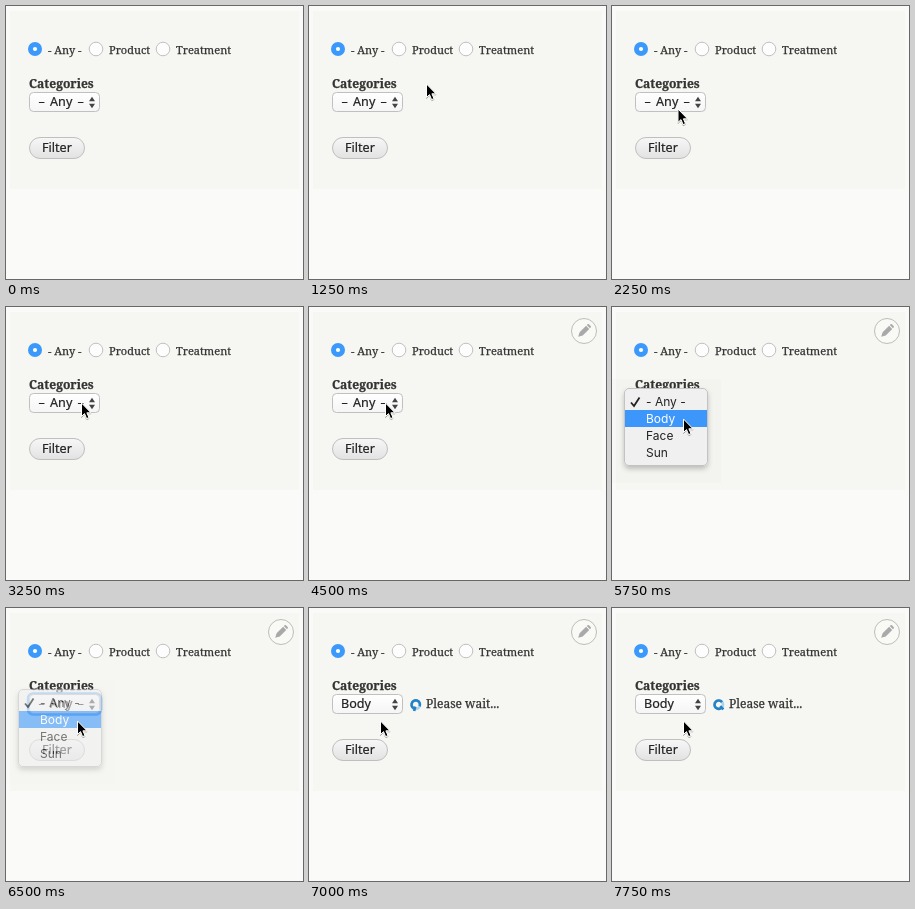
Animation, 297 px wide and 273 px high, one loop 8000 ms. Source, as an HTML page:

```html
<!DOCTYPE html>
<html lang="en">
<head>
<meta charset="utf-8">
<title>Filter form</title>
<style>
html, body { margin: 0; width: 100%; height: 100%; overflow: hidden; background: #fafaf8; }
svg { display: block; }
.serif { font: 11px "Noto Serif", serif; fill: #333; }
.serif text, text.serif { stroke: #333; stroke-width: .25px; }
.sans { font: 12.6px "Noto Sans", sans-serif; fill: #222; stroke: #222; stroke-width: .2px; }
.menu { font: 12px Inter, sans-serif; fill: #222; }
</style>
</head>
<body>
<svg width="297" height="273" viewBox="0 0 297 273">
  <defs>
    <linearGradient id="face" x2="0" y2="1">
      <stop stop-color="#fff"/><stop offset="1" stop-color="#f5f5f5"/>
    </linearGradient>
    <linearGradient id="pill" x2="0" y2="1">
      <stop stop-color="#f7f7f7"/><stop offset="1" stop-color="#e2e2e2"/>
    </linearGradient>
    <filter id="shadow" x="-20%" y="-20%" width="140%" height="150%">
      <feDropShadow dx="0" dy="3" stdDeviation="2.5" flood-opacity=".22"/>
    </filter>
    <filter id="lift" x="-50%" y="-50%" width="200%" height="200%">
      <feDropShadow dx="0" dy="1" stdDeviation=".7" flood-opacity=".35"/>
    </filter>
  </defs>

  <rect x="4" y="5" width="289" height="178" fill="#f6f7f2"/>

  <g class="serif">
    <circle cx="29" cy="43" r="7" fill="#3b99fc"/>
    <circle cx="29" cy="43" r="2.1" fill="#fff"/>
    <g fill="#fdfdfd" stroke="#c0c0c0">
      <circle cx="90" cy="43" r="6.8"/>
      <circle cx="157" cy="43" r="6.8"/>
    </g>
    <text x="42" y="48">- Any -</text>
    <text x="103" y="48">Product</text>
    <text x="170" y="48">Treatment</text>
    <text x="23" y="82" style="font-size:12.1px;font-weight:bold">Categories</text>
  </g>

  <rect id="ring" x="22" y="85.5" width="73" height="21" rx="5" fill="none" stroke="#7db7f2" stroke-width="2.5"/>
  <rect x="23.5" y="86.5" width="70" height="19" rx="4" fill="url(#face)" stroke="#c0c0c0"/>
  <path d="M83 95.2l3-4.4 3 4.4zM83 97.8l3 4.4 3-4.4z" fill="#444"/>
  <text id="value" class="sans" y="100"></text>

  <rect x="23.5" y="131.5" width="55" height="21" rx="10.5" fill="url(#pill)" stroke="#bfbfbf"/>
  <text class="sans" x="36" y="146">Filter</text>

  <g id="wait">
    <g id="spinner" fill="none" stroke-width="2.6">
      <circle r="4.2" stroke="#a9d3ee"/>
      <path d="M3.2 2.6A4.2 4.2 0 1 1 3.2-2.6M1.4 1.4L4.6 4.6" stroke="#2582c6"/>
    </g>
    <text class="serif" x="117" y="100" style="font-size:12px">Please wait...</text>
  </g>

  <g id="edit">
    <circle cx="275" cy="24" r="12.5" fill="#f9f9f6" stroke="#bdbdbb"/>
    <path transform="translate(275 24) rotate(45)" fill="#a9a9a9"
      d="M-2.2-5.2h4.4v9.2l-2.2 4.2-2.2-4.2zM-2.2-6.2v-1a1 1 0 0 1 1-1h2.4a1 1 0 0 1 1 1v1z"/>
  </g>

  <g id="menu" class="menu">
    <rect y="72" width="109" height="104" fill="#000" opacity=".012"/>
    <rect x="12.5" y="81.5" width="83" height="77" rx="4.5" fill="#f0f0f0" stroke="#c3c3c3" filter="url(#shadow)"/>
    <rect id="bar" x="13" width="82" height="17" fill="#3d97fb"/>
    <path id="check" d="M19 95.5l3 3.5 5.5-8.5" fill="none" stroke-width="1.8"/>
  </g>

  <path id="cursor" d="M.5 0V13.4L3.5 10.6 5.6 15.6 8 14.6 5.9 9.8H10Z" fill="#000" stroke="#fff" filter="url(#lift)"/>
</svg>
<script>
const LOOP = 8000;
const $ = id => document.getElementById(id);

// time, x, y of the pointer tip
const pointer = [
  [750, 251, 17], [1000, 175, 66], [1250, 117, 78], [1500, 104, 77], [1750, 94, 70],
  [2000, 67, 95], [2250, 65.5, 103], [2500, 65.5, 102], [2750, 65, 101], [3000, 71, 98],
  [3250, 75, 96], [4500, 76, 96], [4750, 80, 97], [5750, 71, 112], [6000, 71, 115],
  [6250, 71, 113]
];

const items = ["- Any -", "Body", "Face", "Sun"].map((label, i) => {
  const text = document.createElementNS("http://www.w3.org/2000/svg", "text");
  text.textContent = label;
  text.setAttribute("x", 34);
  text.setAttribute("y", 99 + 17 * i);
  $("menu").append(text);
  return text;
});

const show = (id, on) => $(id).style.display = on ? "" : "none";

function draw(t) {
  const at = pointer.findLast(p => p[0] <= t);
  show("cursor", at);
  if (at) $("cursor").setAttribute("transform", `translate(${at[1]} ${at[2]})`);

  show("edit", t >= 4500);
  show("ring", t >= 6500 && t < 7000);
  show("menu", t >= 5000 && t < 6750);
  $("menu").setAttribute("opacity", t < 6500 ? 1 : 0.6);

  const active = t < 5750 ? 0 : 1;
  $("bar").setAttribute("y", 86 + 17 * active);
  items.forEach((item, i) => item.style.fill = i === active ? "#fff" : "#222");
  $("check").setAttribute("stroke", active ? "#222" : "#fff");

  const chosen = t >= 7000;
  $("value").textContent = chosen ? "Body" : "– Any –";
  $("value").setAttribute("x", chosen ? 32 : 32.5);
  $("value").style.wordSpacing = chosen ? "" : "2px";
  show("wait", chosen);
  const turn = (Math.floor(t / 250) - 31) * 100;
  $("spinner").setAttribute("transform", `translate(106.8 96.7) rotate(${turn})`);
}

const start = performance.now();
function tick() {
  draw((performance.now() - start) % LOOP);
  requestAnimationFrame(tick);
}
tick();
</script>
</body>
</html>
```
